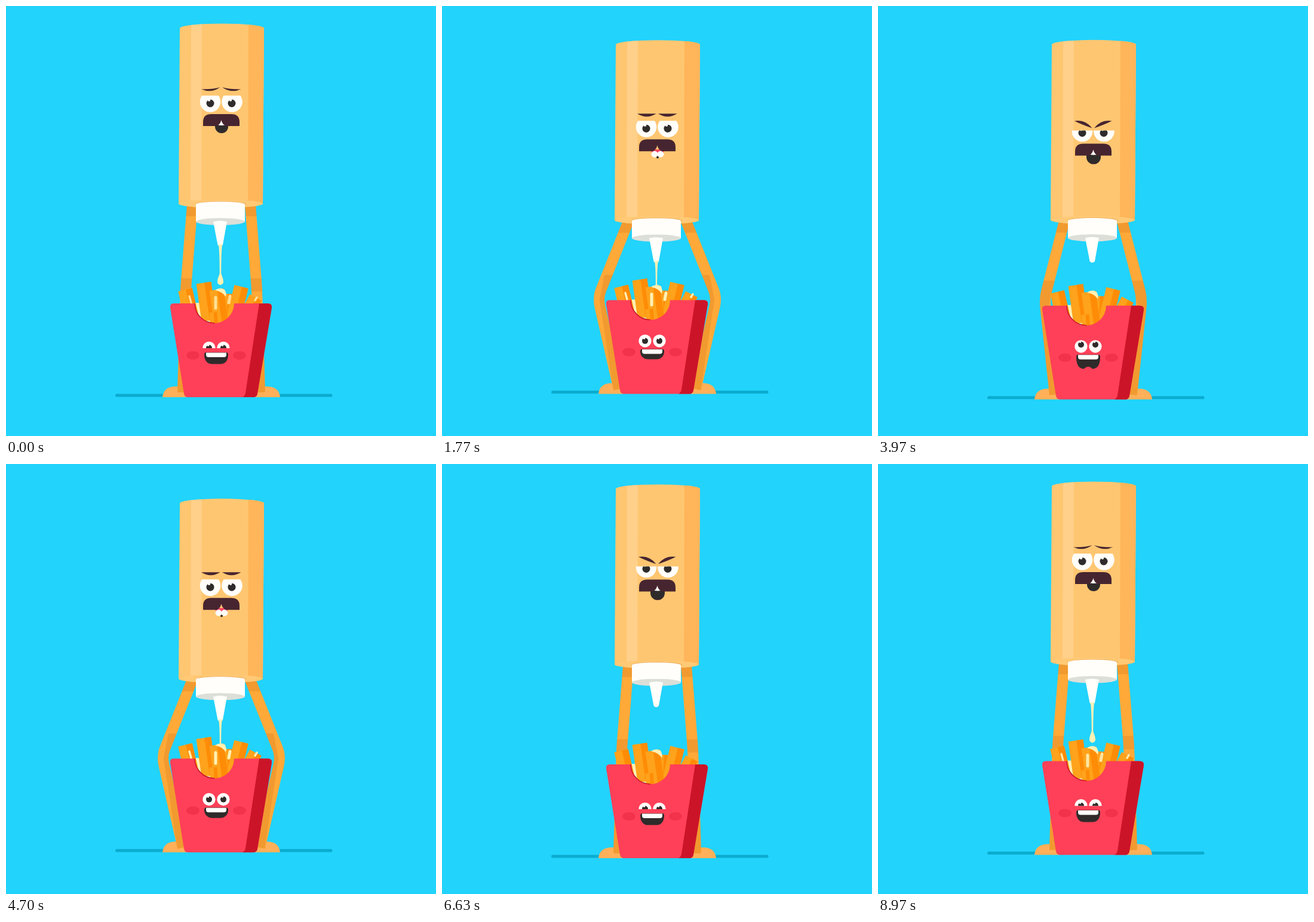
An HTML page that plays this animation: 720 by 720 pixels, repeating every 9.01 s.

```html
<!DOCTYPE html>
<html lang="en">
<head>
<meta charset="utf-8">
<title>Sauce and fries</title>
<style>
  html, body { margin: 0; width: 100%; height: 100%; overflow: hidden; background: #22d3fc; }
  svg { display: block; width: 100vw; height: 100vh; }
  .dark { fill: #2f2b2b; }
  .white { fill: #fffefa; }
  .hair { fill: #472530; }
  .cream { fill: #fff1b4; }
</style>
</head>
<body>
<svg viewBox="0 0 720 720">
  <defs>
    <g id="arms" fill="none" stroke-width="18">
      <path id="armL"/><path id="armR"/>
    </g>
    <mask id="armMask" maskUnits="userSpaceOnUse" x="0" y="0" width="720" height="720">
      <use href="#arms" stroke="#fff"/>
    </mask>
    <clipPath id="bodyClip"><path d="M291 37A70.5 7.5 0 0 1 432 37L430 331A70.5 7 0 0 1 289 331Z"/></clipPath>
    <clipPath id="lidTop"><rect id="lidTopBox" x="320" width="80" height="60"/></clipPath>
    <clipPath id="lidLow"><rect id="lidLowBox" x="320" y="530" width="70"/></clipPath>
    <clipPath id="lipClip"><path id="lipShape"/></clipPath>
  </defs>

  <rect width="720" height="720" fill="#22d3fc"/>

  <g data-box>
    <path d="M185.500 652H544" stroke="#0aaccf" stroke-width="5" stroke-linecap="round"/>
    <path d="M262 655Q264 637 284 637H304V655ZM459 655Q457 637 437 637H417V655Z" fill="#ffb058"/>
  </g>

  <use href="#arms" stroke="#ffa938"/>
  <g mask="url(#armMask)" opacity=".13">
    <rect data-bottle x="280" y="330" width="160" height="22" fill="#903800"/>
    <path data-box d="M281 467H439L445 498L421 655H299L275 498Z" fill="none" stroke="#903800" stroke-width="22"/>
  </g>

  <g data-bottle>
    <g clip-path="url(#bodyClip)">
      <rect x="280" y="20" width="160" height="325" fill="#ffc671"/>
      <path d="M310 20H328L327 345H309Z" fill="#ffd08a"/>
      <path d="M406 20H440V345H405Z" fill="#ffb559"/>
      <ellipse cx="359.500" cy="331" rx="70.500" ry="7" fill="#ffc975"/>
    </g>
    <path d="M317 332A42 5 0 0 1 402 332" fill="#e39a40"/>
    <path class="white" d="M318 332A41 4.500 0 0 1 400 332V361H318Z"/>
    <ellipse cx="359" cy="361" rx="41" ry="6" fill="#dcdfd8"/>
    <path class="white" d="M347 361Q358.500 358 370 361L363 400Q358.500 405 354.500 400Z"/>
  </g>

  <g id="face">
    <g class="hair"><path id="browL"/><path id="browR"/></g>
    <g clip-path="url(#lidTop)">
      <g class="white"><circle cx="342" cy="-20.500" r="17.300"/><circle cx="378.500" cy="-20.500" r="17.300"/></g>
      <g class="dark"><circle cx="342" cy="-18" r="6.500"/><circle cx="378" cy="-18" r="6.500"/></g>
      <g class="white"><circle cx="340" cy="-23.500" r="2.200"/><circle cx="376" cy="-23.500" r="2.200"/></g>
    </g>
    <g id="talk">
      <path id="lipFill" class="dark"/>
      <g clip-path="url(#lipClip)">
        <ellipse id="tongue" cx="361" rx="9" ry="6" fill="#f23355"/>
        <path class="white" d="M350 8H372V17Q361 21 350 17Z"/>
      </g>
    </g>
    <g id="purse">
      <path d="M350 19Q352 16 361 17Q370 16 372 19L369 25H353Z" fill="#ff4462"/>
      <circle class="dark" cx="361" cy="30" r="2"/>
      <g class="white"><circle cx="356" cy="25" r="5.400"/><circle cx="366" cy="25" r="5.400"/></g>
    </g>
    <path class="hair" d="M330 20V13Q330 0 344 0H377Q391 0 391 13V20H368Q362 17 360.500 10Q359 17 353 20Z"/>
  </g>

  <g data-box>
    <path class="cream" d="M316 497H382A33 33 0 0 1 316 497Z"/>
    <path id="splat" class="cream" d="M354 503V476Q361 470 367 475L369 483Q377 482 378 503Z"/>
    <g id="fries"></g>
    <g id="drips" fill="none" stroke="#fff1b4" stroke-linecap="round">
      <path d="M351 488V506M375 486L373 497" stroke-width="5"/>
      <path d="M307 486L310 497M420 488L417 493" stroke-width="3.500"/>
    </g>
    <path class="cream" d="M350 476Q358 470 366 475Q370 482 368 487Q362 478 350 476Z"/>
  </g>

  <g id="sauce" class="cream"><path id="thread"/><path id="drop"/></g>

  <g data-box>
    <path d="M281 498H316A33 33 0 0 0 382 498H438Q446 498 445 505L421 649Q420 655 414 655H305Q299 655 298 649L275 505Q274 498 281 498Z" fill="#ff4058"/>
    <path d="M424 498H438Q446 498 445 505L421 649Q420 655 414 655H396Q400 653 401 648Z" fill="#cc1428"/>
    <path d="M316 498A33 33 0 0 0 349 531" fill="none" stroke="#cc1428" stroke-width="1.500"/>
    <g fill="#f2324a"><ellipse cx="313" cy="585" rx="11" ry="7"/><ellipse cx="391" cy="585" rx="11" ry="7"/></g>
    <g clip-path="url(#lidLow)">
      <g id="boxEyes">
        <g class="white"><circle cx="340" r="10.600"/><circle cx="364" r="10.600"/></g>
        <g id="boxPupils">
          <g class="dark"><circle cx="340" r="5"/><circle cx="364" r="5"/></g>
          <g class="white"><circle cx="338.500" cy="-4.500" r="1.800"/><circle cx="362.500" cy="-4.500" r="1.800"/></g>
        </g>
      </g>
    </g>
    <path id="boxMouth" class="dark"/>
    <path class="white" d="M335 580.500H369V584Q369 588 365 588H339Q335 588 335 584Z"/>
  </g>
</svg>

<script>
const LOOP = 9010, CYCLE = LOOP / 3;
const $ = id => document.getElementById(id);
const set = (id, attrs) => { for (const k in attrs) $(id).setAttribute(k, attrs[k]); };
const shift = (name, y) => document.querySelectorAll(`[data-${name}]`)
  .forEach(e => e.setAttribute("transform", `translate(0 ${y})`));
const show = (id, on) => set(id, { visibility: on ? "visible" : "hidden" });
const mix = (a, b, k) => a + (b - a) * k;
const wave = (t, peak, turns = 1) => Math.cos(2 * Math.PI * turns * (t - peak) / CYCLE);

function ramp(t, from, to) {
  const x = Math.max(0, Math.min(1, (t - from) / (to - from)));
  return x * x * (3 - 2 * x);
}
const pulse = (t, a, b, c, d) => ramp(t, a, b) - ramp(t, c, d);

function fry(x, y, lean, width = 24) {
  const half = (left, w, fill) => `<rect x="${left}" width="${w}" height="64" fill="${fill}"/>`;
  return `<g transform="translate(${x} ${y}) rotate(${lean})">`
    + half(-width / 2, width, "#ffa21c") + half(width * 0.05, width * 0.45, "#ff8c06") + "</g>";
}
$("fries").innerHTML = fry(371, 482, 3, 16) + fry(418, 488, 28, 22) + fry(300, 475, -13)
  + fry(394, 470, 14) + fry(331, 463.5, -8, 25) + fry(352.5, 475, -8) + fry(347, 513, -4, 13);

function drawArms(bottle, box, t) {
  const hand = [312, 333 + bottle], foot = [296, 647 + box];
  const bend = pulse(t, 700, 1200, 2000, 3000);
  const elbow = [301 - 40 * bend, 473 + 0.6 * bottle + 0.2 * box];
  const near = end => end.map((v, i) => mix(elbow[i], v, 0.1));
  const arm = side => "M" + side(hand) + "L" + side(near(hand))
    + "Q" + side(elbow) + " " + side(near(foot)) + "L" + side(foot);
  set("armL", { d: arm(p => p.join(" ")) });
  set("armR", { d: arm(([x, y]) => `${721 - x} ${y}`) });
}

function drawFace(t, bottle) {
  const slide = 23 * ramp(t, 350, 1050) - 8.5 * ramp(t, 1100, 1750) - 14.5 * ramp(t, 2200, 2950);
  set("face", { transform: `translate(0 ${181 + bottle + slide})` });

  const anger = pulse(t, 200, 600, 1100, 1700) + pulse(t, 1900, 2400, 2500, 2950);
  const worry = 1 - pulse(t, 800, 1700, 2300, 2900);
  const outer = mix(-43 + worry, -38, anger);
  const inner = mix(-43 - 2 * worry, -26, anger);
  const top = mix(-43 + 2 * worry, -41, anger);
  const low = mix(-33 - worry, -32, anger);
  const brow = side => `M${side(327 + 2 * anger)} ${outer}Q${side(344 + 3 * anger)} ${top} ${side(358.5)} ${inner}
    Q${side(343 - 2 * anger)} ${low} ${side(327 + 2 * anger)} ${outer}Z`;
  set("browL", { d: brow(x => x) });
  set("browR", { d: brow(x => 720.5 - x) });
  set("lidTopBox", { y: mix(-31, -22, anger) });

  const pursed = t > 1500 && t < 2050;
  show("talk", !pursed);
  show("purse", pursed);
  const bottom = 32 + 2.5 * anger, w = 11 + anger;
  const d = `M${361 - w} 10H${361 + w}V${bottom - w}A${w} ${w} 0 0 1 ${361 - w} ${bottom - w}Z`;
  set("lipFill", { d });
  set("lipShape", { d });
  set("tongue", { cy: 40 - 6 * pulse(t, 2100, 2450, 2550, 2950) });
}

function drawBoxFace(t) {
  const open = pulse(t, 700, 900, 1950, 2200);
  const eye = mix(572.5, 566.3, open);
  set("boxEyes", { transform: `translate(0 ${eye})` });
  set("boxPupils", { transform: `translate(0 ${-3 * pulse(t, 750, 950, 1150, 1400)})` });
  set("lidLowBox", { height: eye + 0.5 + open * 12 - 530 });

  const chat = wave(t, 1060, 2);
  const b = 600.5 + 3.5 * chat, dent = b - 8 * Math.max(0, chat);
  set("boxMouth", { d: `M335 580H369Q372 580 372 584C372 ${b - 5} 366 ${b} 359 ${b}
    Q352 ${dent} 345 ${b}C338 ${b} 332 ${b - 5} 332 584Q332 580 335 580Z` });
}

// The pour runs past the end of a cycle, so its clock does too.
function drawSauce(t, bottle, box) {
  const u = t < 600 ? t + CYCLE : t;
  const wet = pulse(u, 1150, 1500, 2500, 3500);
  set("splat", { transform: `translate(0 ${6 - 6 * wet})` });
  set("drips", { opacity: Math.min(1, wet * 1.6) });
  show("sauce", u > 1080 && u < 3260);

  const broken = ramp(u, 2150, 2400), fall = ramp(u, 3030, 3260);
  const tip = 399 + bottle, splash = 474 + box;
  const end = mix(tip, splash - 7 * (broken - fall), ramp(u, 1080, 1300));
  const top = mix(tip, end, fall);
  const x = 359, neck = mix(top, end, 0.25);
  set("thread", { d: `M${x - 3} ${top}H${x + 3}Q${x + 1} ${neck} ${x + 1.2} ${end}H${x - 1.2}Q${x - 1} ${neck} ${x - 3} ${top}Z` });
  const r = 5 * broken, h = 24 * broken;
  set("drop", { d: `M${x} ${end - h}C${x + 1} ${end - h * 0.7} ${x + r} ${end - h * 0.5} ${x + r} ${end - r}
    A${r} ${r} 0 0 1 ${x - r} ${end - r}C${x - r} ${end - h * 0.5} ${x - 1} ${end - h * 0.7} ${x} ${end - h}Z` });
}

function draw(time) {
  const t = (time % LOOP) % CYCLE;
  const bottle = 29 * pulse(t, 480, 1050, 1607, 2857);
  const box = 6.2 * wave(t, 660) - 1.2;
  shift("bottle", bottle);
  shift("box", box);
  drawArms(bottle, box, t);
  drawFace(t, bottle);
  drawBoxFace(t);
  drawSauce(t, bottle, box);
}

const start = performance.now();
function tick() {
  draw(performance.now() - start);
  requestAnimationFrame(tick);
}
tick();
</script>
</body>
</html>
```
